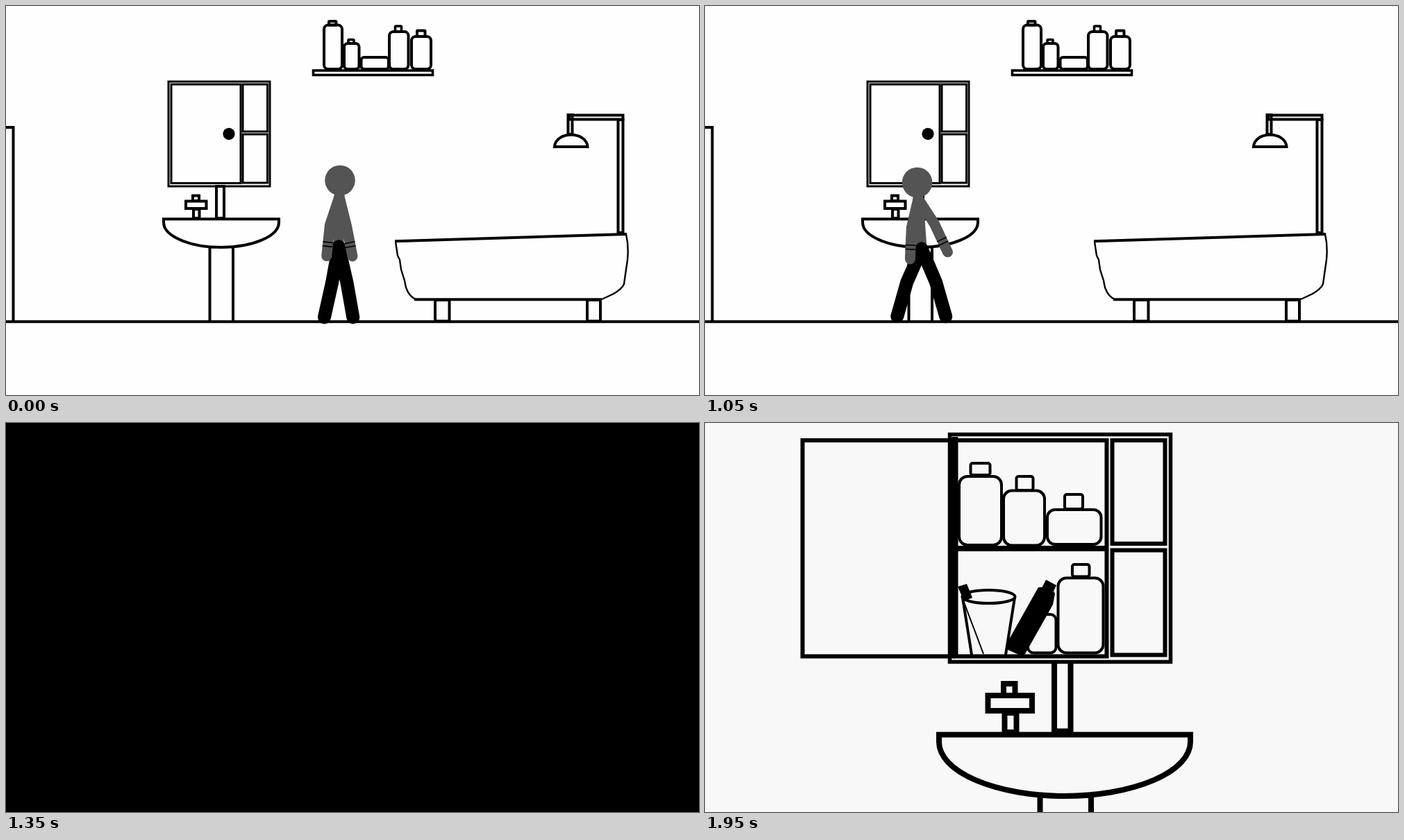
An HTML page that plays this animation: 998x561 px, repeating every 2.4 s.

```html
<!DOCTYPE html>
<html lang="en">
<head>
<meta charset="utf-8">
<title>Bathroom</title>
<style>
html, body { margin: 0; width: 100%; height: 100%; overflow: hidden; background: #fefefe; }
svg { display: block; width: 998px; height: 561px; }
g { fill: none; stroke: #000; }
.solid { fill: #000; stroke: none; }
.white { fill: #fefefe; }
#figure { stroke-linecap: round; stroke-linejoin: round; }
.leg { stroke-width: 19; }
.skin { stroke: #545454; stroke-width: 15; }
.band { stroke-width: 1.6; stroke-linecap: butt; }
#head { fill: #545454; stroke: none; }
</style>
</head>
<body>
<svg viewBox="0 0 998 561">
  <rect width="998" height="561" fill="#fefefe"/>
  <g id="room" stroke-width="4">
    <path d="M0 455.3H998M0 175H10.5V455"/>
    <circle class="solid" cx="321" cy="184.3" r="8.6"/>
    <path d="M227 307.3H393V312A83 36 0 0 1 227 312ZM293.5 348V455M327 348V455"/>
    <path d="M790 203H837.5C836 180 791.5 180 790 203Z"/>
    <path d="M560 339.3L894 329M588 423.3H858"/>
    <path stroke-width="2.4" d="M561 340L564 360L567 366L569 380L574 396L576 406Q581 420 591 423.3H615
      M893 329Q897 346 895 366L890 401Q887 408 875 415L858 423"/>
    <g id="figure">
      <path id="torso" class="skin"/>
      <path id="legA" class="leg"/>
      <path id="legB" class="leg"/>
      <path id="armP" class="skin"/>
      <path id="armQ" class="skin"/>
      <path id="bandP" class="band"/>
      <path id="bandQ" class="band"/>
      <circle id="head" r="21.8"/>
    </g>
  </g>
  <g id="closeup" stroke-width="8">
    <path d="M360 20V339" stroke-width="9"/>
    <path d="M360 181H580"/>
    <path stroke-width="4" d="M371 252L384 334M446 252L433 334"/>
    <ellipse cx="408.5" cy="250.5" rx="38" ry="9.5" stroke-width="4"/>
    <path stroke-width="2" d="M372 256L401 333"/>
    <path class="solid" d="M364 236L377 232L385 252L373 257Z"/>
    <path d="M503 346V446M526.5 346V446M499 444.5H530"/>
    <path d="M337 449.5H699V460A181 78 0 0 1 337 460ZM482.5 538V561M556 538V561"/>
  </g>
  <rect id="shade" width="998" height="561"/>
</svg>
<script>
const $ = id => document.getElementById(id);
const room = $('room'), closeup = $('closeup'), figure = $('figure');

// Rectangle from the centre lines of its edges.
function box(parent, x1, y1, x2, y2, width, r = 0, before = null) {
  const el = document.createElementNS('http://www.w3.org/2000/svg', 'rect');
  const attrs = { x: x1, y: y1, width: x2 - x1, height: y2 - y1, rx: r, 'stroke-width': width };
  for (const key in attrs) el.setAttribute(key, attrs[key]);
  parent.insertBefore(el, before);
  return el;
}
const roomBox = (x1, y1, x2, y2, width = 4, r = 0) => box(room, x1, y1, x2, y2, width, r, figure);
const nearBox = (x1, y1, x2, y2, width = 4, r = 0) => box(closeup, x1, y1, x2, y2, width, r);

// Cabinet, tap, pipe
roomBox(234, 109, 380, 260, 3);
roomBox(238, 113, 338, 255.5, 3);
roomBox(341, 113, 376.5, 181, 3);
roomBox(341, 185, 376.5, 255, 3);
roomBox(303, 260, 314, 306);
roomBox(259, 281.5, 288.5, 292);
roomBox(269, 273.5, 278, 281);
roomBox(270, 293, 278.5, 306);
// Shelf and bottles
roomBox(442.5, 93, 614.5, 99.5, 3.6);
roomBox(458, 27.5, 484, 91, 4, 6);
roomBox(465, 22, 475.5, 27.5, 4, 1);
roomBox(487, 54, 508.5, 91, 4, 5);
roomBox(493, 48.5, 501, 54, 3.6, 1);
roomBox(511.5, 74, 551, 91, 4, 4);
roomBox(552, 37, 579.5, 91, 4, 6);
roomBox(560.5, 29, 569.5, 37, 3.6, 1);
roomBox(584, 44, 612, 91, 4, 6);
roomBox(592, 35.5, 603.5, 44, 4, 1);
// Shower and tub feet
roomBox(881.5, 164, 888.5, 327);
roomBox(811, 157.5, 888.5, 163.5);
roomBox(809.5, 157, 815.5, 185);
roomBox(618, 424, 638.5, 454.5);
roomBox(837, 424, 856, 454.5);

// Open cabinet
nearBox(352.5, 16.5, 670.5, 344.5, 5.5);
nearBox(140.5, 25, 357, 336.5, 6);
nearBox(360, 25, 578.5, 336.5, 6);
nearBox(586.5, 25, 662.5, 174, 6);
nearBox(586.5, 183.5, 662.5, 334.5, 6);
nearBox(366, 77, 427, 176, 4, 12);
nearBox(382.5, 58, 410.5, 75, 4, 3);
nearBox(430, 97.5, 489, 176.5, 4, 12);
nearBox(448.5, 77, 472.5, 97, 4, 3);
nearBox(493, 125, 570.5, 175, 4, 11);
nearBox(518, 103, 544, 124, 4, 3);
nearBox(465, 276, 505.5, 331.5, 4, 8);
nearBox(508.5, 223.5, 573.5, 331.5, 4, 12);
nearBox(529, 204, 553.5, 221.5, 4, 3);
nearBox(407.5, 393, 471, 415, 8);
nearBox(430, 376, 446.5, 393, 8);
nearBox(431.5, 418, 448.5, 446, 8);
closeup.insertAdjacentHTML('beforeend',
  `<path class="solid" d="M480 237L498 236L504 246L501 262L461 333L456 336L436 327L434 319Z
    M491 226L506 234L500 247L484 240Z"/>`);

// time, hip x, hip y, lean, then upper and lower angle of legs A, B and arms P, Q
const poses = [
  [120, 479, 347, 1, 13, 10, -10.3, -12.6, 14, 11, -18.4, -6],
  [270, 452, 348, 2, -18, 22, 3, 6, -3, -9, 0, 1],
  [420, 425, 349, 3, -28.5, -1, 14, 18.8, -20, -30, 19, 8],
  [540, 403.5, 348, 3, -10, 5, -16, 28, 3, -4, -1, -8],
  [650, 383.7, 349, 3, 9, 13, -28, -6, 24, 16, -20, -28],
  [830, 351.5, 348, 1, -14, 30, -10, 5, 8, 6, 4, -2],
  [1050, 312, 350, -5, -23.7, -15.8, 23, 16, -13, -2.5, 33, 25],
  [1230, 312, 350, -5, -23.7, -15.8, 23, 16, -13, -2.5, 136, 151]
];

function poseAt(t) {
  const last = poses.length - 1;
  if (t <= poses[0][0]) return poses[0];
  if (t >= poses[last][0]) return poses[last];
  const i = poses.findIndex(p => p[0] > t);
  const a = poses[i - 1], b = poses[i];
  const k = (t - a[0]) / (b[0] - a[0]);
  return a.map((v, j) => v + (b[j] - v) * k);
}

// Angles are measured from straight down, positive to the right.
function reach([x, y], length, deg) {
  const rad = deg * Math.PI / 180;
  return [x + length * Math.sin(rad), y + length * Math.cos(rad)];
}
const line = (...points) => 'M' + points.map(p => p.map(v => v.toFixed(2)).join(' ')).join('L');

function limb(id, root, upper, lower, a, b) {
  const joint = reach(root, upper, a), end = reach(joint, lower, b);
  $(id).setAttribute('d', line(root, joint, end));
  return end;
}

function arm(side, root, a, b) {
  const hand = limb('arm' + side, root, 43, 45, a, b);
  const band = d => {
    const mid = reach(hand, -d, b);
    return line(reach(mid, -7.5, b + 90), reach(mid, 7.5, b + 90));
  };
  $('band' + side).setAttribute('d', band(14) + band(20));
}

function drawFigure(t) {
  const [, x, y, lean, a1, a2, b1, b2, p1, p2, q1, q2] = poseAt(t);
  const hip = [x, y], neck = [x + lean, y - 72];
  $('torso').setAttribute('d', line(neck, hip));
  limb('legA', hip, 53, 51, a1, a2);
  limb('legB', hip, 53, 51, b1, b2);
  arm('P', neck, p1, p2);
  arm('Q', neck, q1, q2);
  $('head').setAttribute('cx', neck[0] + 0.6 + 0.4 * lean);
  $('head').setAttribute('cy', neck[1] - 23.5);
}

function shadeAt(t) {
  if (t < 1350) return Math.max(0, (t - 1170) / 180);
  if (t < 1800) return 1;
  return 0.9 - 0.876 * Math.min(1, (t - 1800) / 150);
}

const start = performance.now();
function draw() {
  const t = Math.floor((performance.now() - start) % 2400 / 30) * 30;
  const near = t >= 1350;
  room.style.display = near ? 'none' : '';
  closeup.style.display = near ? '' : 'none';
  if (!near) drawFigure(t);
  $('shade').setAttribute('opacity', shadeAt(t));
  requestAnimationFrame(draw);
}
draw();
</script>
</body>
</html>
```
